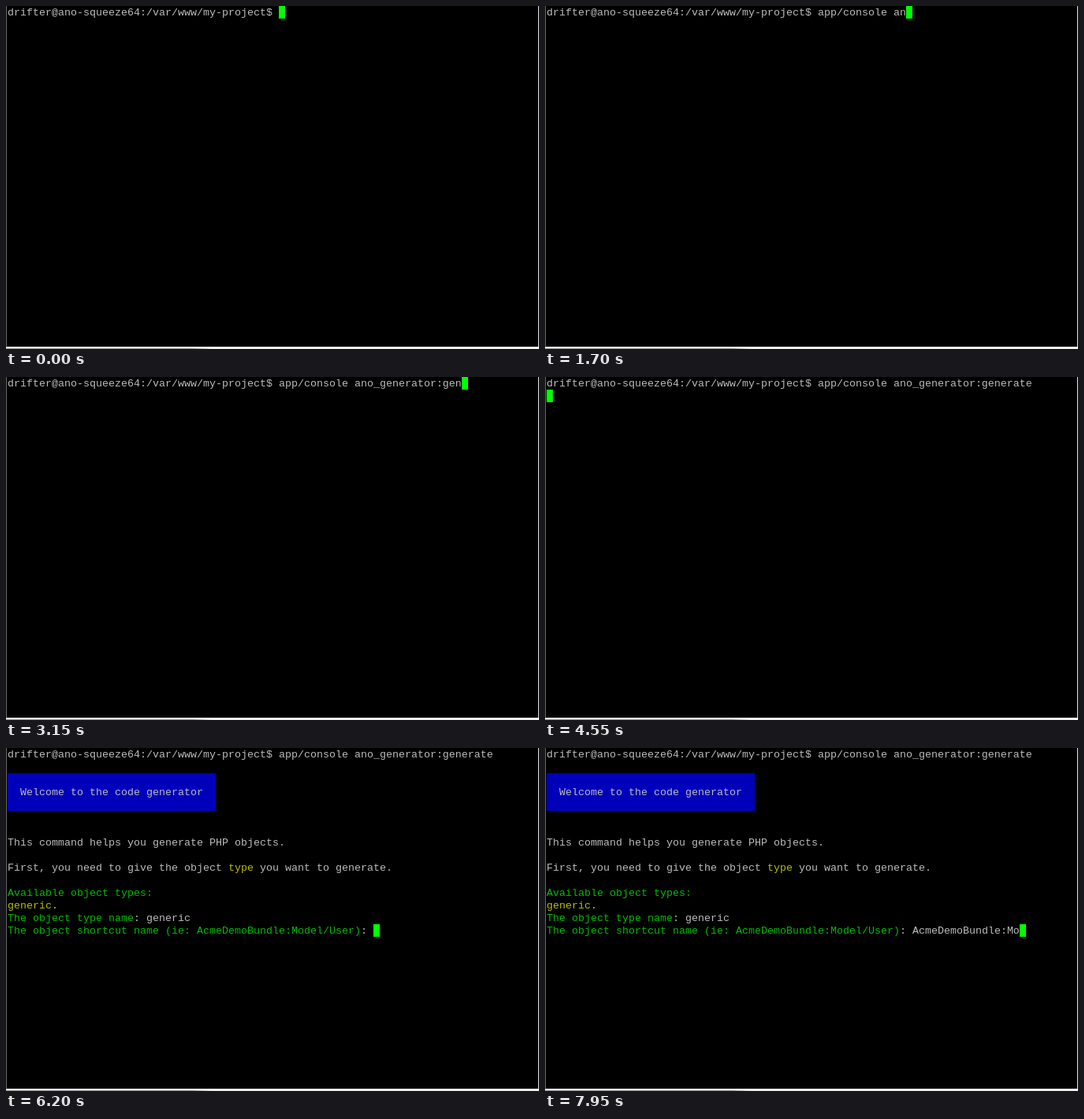
Write an HTML page that moves like this. It is 676x436 px and loops after 8000 ms.

```html
<!DOCTYPE html>
<html lang="en">
<head>
<meta charset="utf-8">
<title>Terminal session</title>
<style>
  html, body { margin: 0; width: 100%; height: 100%; overflow: hidden; background: #fff; }
  #stage { position: relative; width: 676px; height: 436px; overflow: hidden; background: #fff; }
  #window {
    position: absolute; left: 0; top: 0; width: 674px; height: 433px; background: #000;
    border: solid #696969; border-width: 0 1px 1px; border-right-color: #e3e3e3; border-bottom-color: #e3e3e3;
  }
  #shadow {
    position: absolute; left: 0; top: 435px; width: 676px; height: 1px;
    background: linear-gradient(90deg, #909090 0 236px, #f0f0f0 262px);
  }
  #screen {
    position: absolute; left: 1px; top: 0; color: #bbb; white-space: pre;
    font: 13.3333px/18px "Liberation Mono", "Courier New", monospace;
    font-variant-ligatures: none;
  }
  /* Lines are taller than their rows, which sets the baseline one pixel lower */
  #screen div { height: 16px; }
  #screen span { display: inline-block; height: 16px; vertical-align: top; }
  .green { color: #0b0; }
  .yellow { color: #bb0; }
  .banner { background: #00b; }
  .hint { background: #bbb; color: #000; }
  .cursor { background: #0f0; color: #000; }
</style>
</head>
<body>
<div id="stage">
  <div id="window"><div id="screen"></div></div>
  <div id="shadow"></div>
</div>
<script>
const LOOP = 8000;
const PROMPT = 'drifter@ano-squeeze64:/var/www/my-project$ ';
const COMMAND = 'app/console ano_generator:generate';
const ENTER = 4550, WELCOME = 4900, NEXT = 6200;

// Typing bursts: first key, last key, steps, characters
const BURSTS = [
  [350, 550, 3, 3], [850, 1150, 4, 6], [1350, 1500, 3, 4], [1700, 1750, 2, 2],
  [1950, 2450, 7, 7], [2600, 2950, 5, 5], [3150, 3150, 1, 2], [3700, 3700, 1, 1],
  [4150, 4350, 3, 4]
];

// Answers with autocompletion: time, typed text, suggested rest
const TYPE_KEYS = [
  [WELCOME, '', ''], [5250, 'g', 'eneric'], [5350, 'ge', 'neric'], [5450, 'gen', 'eric'],
  [5800, 'gene', 'ric'], [5850, 'generic', '']
];
const NAME_KEYS = [
  [NEXT, '', ''], [6600, 'A', 'sseticBundle'], [6750, 'Ac', 'meDemoBundle'],
  [6950, 'Acm', 'eDemoBundle'], [7250, 'AcmeDemoBundle', ''], [7550, 'AcmeDemoBundle:', ''],
  [7750, 'AcmeDemoBundle:M', ''], [7950, 'AcmeDemoBundle:Mo', '']
];

const span = (cls, text) => `<span class="${cls}">${text}</span>`;
const cursor = (text = ' ') => span('cursor', text);
const green = text => span('green', text);
const yellow = text => span('yellow', text);
const banner = text => span('banner', text.padEnd(33));

const INTRO = [
  '',
  banner(''),
  banner('  Welcome to the code generator'),
  banner(''),
  '', '',
  'This command helps you generate PHP objects.',
  '',
  `First, you need to give the object ${yellow('type')} you want to generate.`,
  '',
  green('Available object types:'),
  yellow('generic') + '.'
];
const ASK_TYPE = green('The object type name') + ': ';
const ASK_NAME = green('The object shortcut name (ie: AcmeDemoBundle:Model/User)') + ': ';

function typedCount(t) {
  let count = 0;
  for (const [first, last, steps, chars] of BURSTS) {
    const gap = steps > 1 ? (last - first) / (steps - 1) : 0;
    let done = 0;
    while (done < steps && t >= Math.round((first + done * gap) / 50) * 50) done++;
    count += Math.round(chars * done / steps);
  }
  return count;
}

function answer(keys, t) {
  const [, typed, rest] = keys.filter(key => t >= key[0]).pop();
  return typed + cursor(rest[0]) + (rest.length > 1 ? span('hint', rest.slice(1)) : '');
}

function screenLines(t) {
  if (t < ENTER) return [PROMPT + COMMAND.slice(0, typedCount(t)) + cursor()];
  const lines = [PROMPT + COMMAND];
  if (t < WELCOME) lines.push(cursor());
  else if (t < NEXT) lines.push(...INTRO, ASK_TYPE + answer(TYPE_KEYS, t));
  else lines.push(...INTRO, ASK_TYPE + 'generic', ASK_NAME + answer(NAME_KEYS, t));
  return lines;
}

const screenEl = document.getElementById('screen');
const start = performance.now();
let shown = '';

function tick() {
  const t = (performance.now() - start) % LOOP;
  const html = screenLines(t).map(line => `<div>${line}</div>`).join('');
  if (html !== shown) screenEl.innerHTML = shown = html;
  requestAnimationFrame(tick);
}
tick();
</script>
</body>
</html>
```
